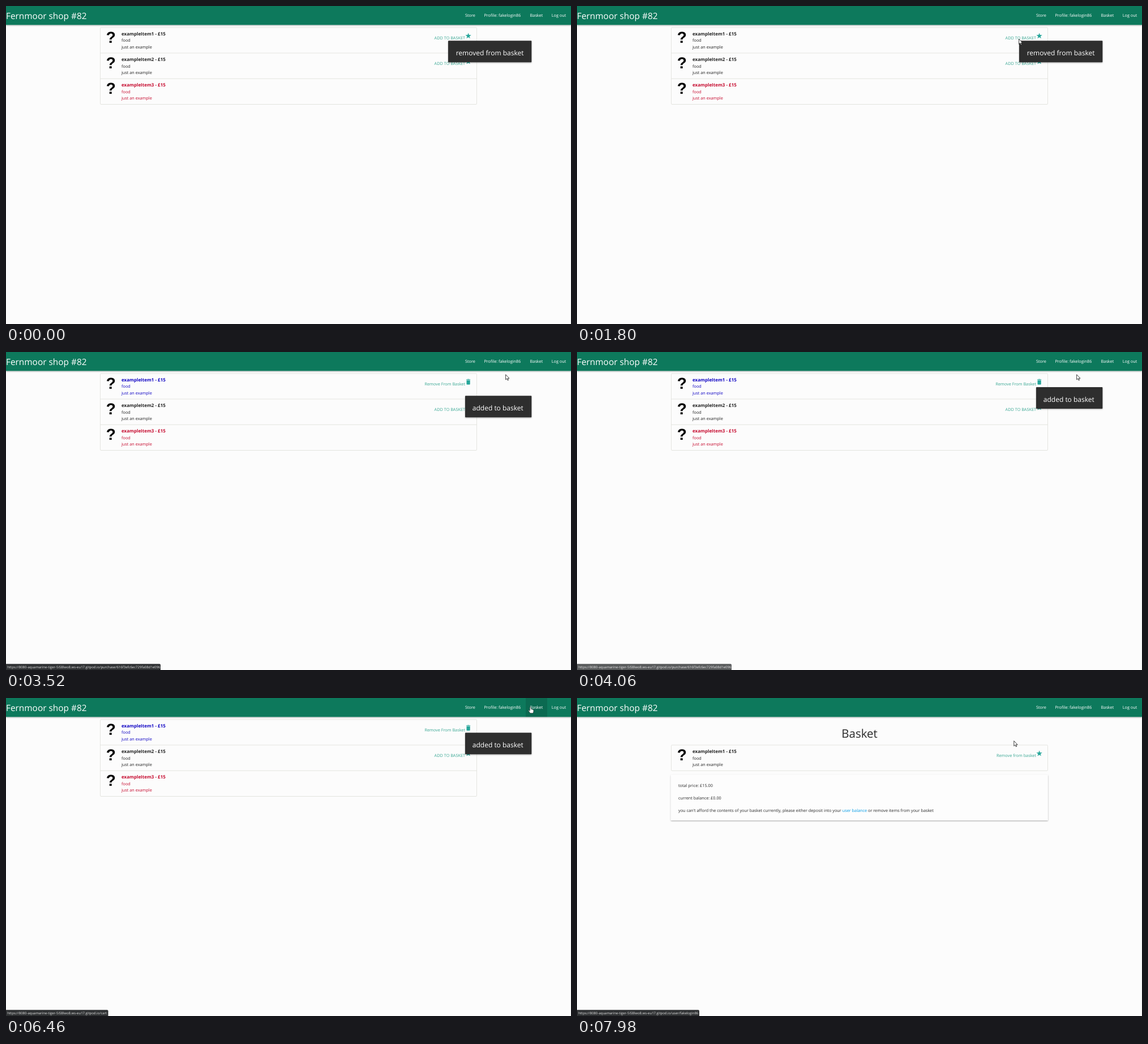
These frames come from a looping animation (998 by 561 pixels, 8000 ms). An HTML page:

```html
<!DOCTYPE html>
<html lang="en">
<head>
<meta charset="utf-8">
<title>Shop basket</title>
<style>
html, body { margin: 0; width: 100%; height: 100%; overflow: hidden; background: #fcfcfc; }
svg { display: block; width: 998px; height: 561px; }
text { font-family: "Open Sans", "Noto Sans", sans-serif; font-size: 7.3px; fill: #2a2a2a; text-rendering: geometricPrecision; white-space: pre; }
.nav text { fill: #fff; }
.nav .brand { font-size: 15.4px; }
.name { font-size: 8px; font-weight: 700; }
.mark { font: 700 28px "Liberation Sans", Arial, sans-serif; fill: #000; text-anchor: middle; }
.act { fill: #3aa894; text-anchor: end; }
.icon { fill: #26a69a; }
.head { font-size: 20.5px; text-anchor: middle; }
.line { fill: none; stroke: #dedfd8; stroke-width: .8; }
.toast text { font-size: 12px; fill: #fff; }
.status text { font-size: 6px; fill: #e4e4e4; }
</style>
</head>
<body>
<svg viewBox="0 0 998 561">
  <defs>
    <filter id="shade" x="-10%" y="-30%" width="120%" height="180%">
      <feDropShadow dx="0" dy="1" stdDeviation="0.9" flood-color="#000" flood-opacity=".35"/>
    </filter>
  </defs>
  <rect width="998" height="561" fill="#fcfcfc"/>
  <path d="M997.5 34V561" stroke="#efefef"/>
  <g id="pages"></g>
  <g class="nav">
    <rect width="998" height="33.3" fill="#0a795b" filter="url(#shade)"/>
    <rect id="hover" height="33.3" fill="#000" opacity=".12"/>
    <text class="brand" x="0" y="23.2">Fernmoor shop #82</text>
    <g id="links"></g>
  </g>
  <g class="toast" id="toast">
    <rect id="toastBox" height="38" rx="1" fill="#2d2d2d" filter="url(#shade)"/>
    <text id="toastText" y="26"></text>
  </g>
  <g class="status" id="status">
    <path id="statusBox" fill="#2f3133"/>
    <text id="statusText" x="2.3" y="557.6"></text>
  </g>
  <path id="arrow" d="M0 0V9L2.1 7.1 3.6 10.3 5 9.6 3.6 6.6H6.3Z" fill="#fff" stroke="#111" stroke-width=".8" stroke-linejoin="round"/>
  <path id="hand" d="M-1 .8Q0-.5 1 .8V4Q2 3.3 2.7 4.2 3.6 3.8 4.2 4.7 5.6 4.5 5.6 6V8Q5.4 9.5 4.5 11H-.5Q-1.4 9.3-3.2 7 -3.6 5.5-2.2 5.9L-1 7Z" fill="#fff" stroke="#222" stroke-width=".6" stroke-linejoin="round"/>
</svg>
<script>
const LOOP = 8000, USER = "fakelogin86";
const HOST = "https://8080-aquamarine-tiger-5i58lwo8.ws-eu17.gitpod.io/";
const el = id => document.getElementById(id);
const show = (node, on) => node.setAttribute("visibility", on ? "visible" : "hidden");
const set = (node, attrs) => { for (const k in attrs) node.setAttribute(k, attrs[k]); };
const text = (x, y, s, attrs = "") => `<text x="${x}" y="${y}" ${attrs}>${s}</text>`;

function starIcon(x, y) {
  const pts = [];
  for (let i = 0; i < 10; i++) {
    const r = i % 2 ? 2.2 : 5.4, a = i * Math.PI / 5;
    pts.push((x + r * Math.sin(a)).toFixed(2) + "," + (y - r * Math.cos(a)).toFixed(2));
  }
  return `<polygon class="icon" points="${pts.join(" ")}"/>`;
}

const binIcon = (x, y) =>
  `<path class="icon" transform="translate(${x} ${y})" d="M-3.6-4.6H-1.8L-1.3-5.1H1.3L1.8-4.6H3.6V-3.5H-3.6ZM-3.1-2.9H3.1V3.7Q3.1 4.7 2.1 4.7H-2.1Q-3.1 4.7-3.1 3.7Z"/>`;

function item(row, n, color, action, icon) {
  const y = 38 + row * 45.2, fill = `style="fill:${color}"`;
  return text(185.4, y + 26.6, "?", 'class="mark"') +
    text(204, y + 14, `exampleItem${n} - £15`, `class="name" ${fill}`) +
    text(204, y + 25.3, "food", fill) +
    text(204, y + 36.7, "just an example", fill) +
    (action ? text(811, y + 20.6, action, 'class="act"') + icon(816.6, y + 14.8) : "");
}

const INK = "#222", BLUE = "#1005c4", RED = "#c60a2e";

function store(first) {
  return `<rect class="line" x="166.5" y="38" width="665" height="135.5" rx="1.5"/>
    <path class="line" d="M166.5 83H831.5M166.5 128.2H831.5"/>` +
    first + item(1, 2, INK, "ADD TO BASKET", starIcon) + item(2, 3, RED);
}

const basket = text(499, 69.6, "Basket", 'class="head"') +
  '<rect class="line" x="166.5" y="83" width="665" height="45.3" rx="1.5"/>' +
  item(1, 1, INK, "Remove from basket", starIcon) +
  '<rect x="165.8" y="135.6" width="666" height="80.4" rx="1" fill="#fdfdfd" filter="url(#shade)"/>' +
  text(179, 157.2, "total price: £15.00") +
  text(179, 179.1, "current balance: £0.00") +
  text(179, 201, "you can't afford the contents of your basket currently, please either deposit into your " +
    '<tspan fill="#039be5">user balance</tspan> or remove items from your basket');

const views = [
  store(item(0, 1, INK, "ADD TO BASKET", starIcon)),
  store(item(0, 1, BLUE, "Remove From Basket", binIcon)),
  basket
];
el("pages").innerHTML = views.map(v => `<g>${v}</g>`).join("");
const pages = [...el("pages").children];
el("links").innerHTML = [[811, "Store"], [844.4, "Profile: " + USER], [925.6, "Basket"], [963.7, "Log out"]]
  .map(([x, s]) => text(x, 19.4, s)).join("");

// time, x, y of the pointer tip
const path = [
  [20, 996, 288], [440, 900, 190], [820, 808, 93], [840, 807, 92],
  [1200, 763, 70], [1560, 804, 76], [1660, 803, 75], [1800, 780.7, 58.3],
  [2000, 771, 54], [2400, 764, 52], [2500, 762, 53], [2520, 759, 52],
  [2780, 759, 52], [3000, 795, 56], [3300, 860, 43], [3480, 882.6, 39.8],
  [4460, 882.6, 39.8], [4800, 895, 28], [5200, 916, 16.4], [5300, 919, 15.8],
  [5700, 933, 15], [6040, 929, 19], [6400, 929, 19], [6460, 926.3, 15.8],
  [7200, 926.3, 15.8], [7580, 912, 8], [7680, 911, 8], [7780, 872, 24],
  [7900, 800, 62], [7980, 771.8, 75.7], [8000, 771.8, 75.7]
];

function pointer(t) {
  let i = 1;
  while (i < path.length - 1 && path[i][0] < t) i++;
  const a = path[i - 1], b = path[i];
  const k = Math.min(1, Math.max(0, (t - a[0]) / (b[0] - a[0])));
  return [a[1] + (b[1] - a[1]) * k, a[2] + (b[2] - a[2]) * k];
}

function drawToast(t, page) {
  show(el("toast"), page === 0 || page === 1 && t >= 3480);
  const left = page ? 811 : 781;
  // the new toast slides up with a cubic ease-out
  const p = t < 3620 ? .043 : Math.min(1, .1 + (t - 3620) / 780);
  const y = 61.3 + (page ? 18.2 * (1 - p) ** 3 : 0);
  set(el("toast"), { transform: `translate(${left} ${y.toFixed(2)})` });
  set(el("toastBox"), { width: 928.3 - left });
  set(el("toastText"), { x: page ? 12.8 : 13.7 });
  el("toastText").textContent = page ? "added to basket" : "removed from basket";
}

function drawStatus(t) {
  const [url, w] = t < 4300 ? ["purchase/616f3efc6ec729fa08d1e096", 273]
    : t < 5420 || t >= 7450 ? ["user/" + USER, 216] : ["cart", 180.5];
  const on = t >= 2780 && t < 4300 || t >= 4900;
  show(el("status"), on);
  const fade = t < 4300 ? Math.min(1, Math.max(0, (4300 - t) / 300)) : 1;
  set(el("status"), { opacity: fade });
  set(el("statusBox"), { d: `M0 550.3H${w - 2}Q${w} 550.3 ${w} 552.3V561H0Z` });
  el("statusText").textContent = HOST + url;
}

function drawPointer(t) {
  const [x, y] = pointer(t);
  const profile = x >= 837 && x < 919.5, inNav = y < 33;
  const hand = inNav && x > 837 && x < 956 || t >= 1860 && t < 2960;
  show(el("hover"), inNav && x > 837 && x < 956 && t > 4460);
  set(el("hover"), profile ? { x: 836.7, width: 81.3 } : { x: 918, width: 38 });
  const transform = `translate(${x.toFixed(2)} ${y.toFixed(2)})`;
  for (const [id, on] of [["arrow", !hand], ["hand", hand]]) {
    show(el(id), on && t >= 20);
    set(el(id), { transform });
  }
}

function draw(t) {
  const page = t < 3440 ? 0 : t < 7200 ? 1 : 2;
  pages.forEach((g, i) => show(g, i === page));
  drawToast(t, page);
  drawStatus(t);
  drawPointer(t);
}

const start = performance.now();
function tick() {
  draw((performance.now() - start) % LOOP);
  requestAnimationFrame(tick);
}
draw(0);
requestAnimationFrame(tick);
</script>
</body>
</html>
```
